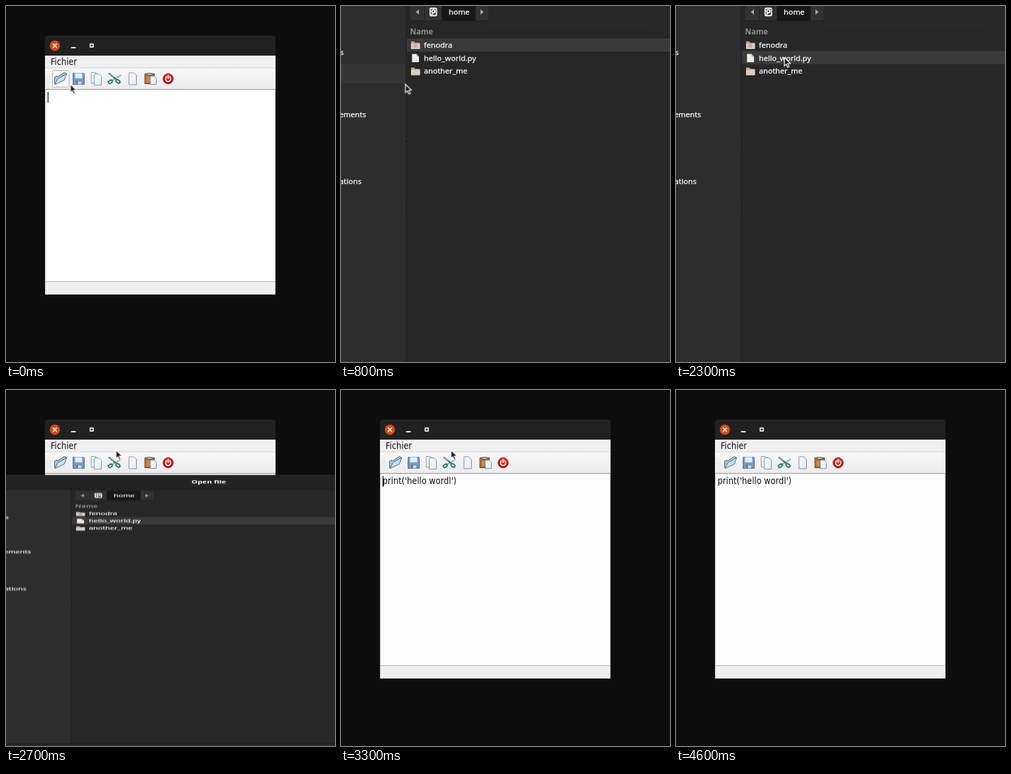
Write an HTML page that moves like this. It is 498 px wide and 538 px high and loops after 4.9 s.

```html
<!DOCTYPE html>
<html lang="fr">
<head>
<meta charset="utf-8">
<title>Text editor</title>
<style>
html, body { margin: 0; width: 100%; height: 100%; overflow: hidden; background: #0d0d0d; }
svg { display: block; width: 498px; height: 538px; }
.qt { font: 13.6px "DejaVu Sans Condensed", "Noto Sans", sans-serif; fill: #111; white-space: pre; }
.gtk { font: 500 11.6px "Noto Sans", "Open Sans", sans-serif; fill: #fff; stroke: #fff; stroke-width: .25; }
.bold { font-weight: 700; stroke: none; }
.end { text-anchor: end; }
.mid { text-anchor: middle; }

/* Every part shares one loop and changes in hard steps. */
.anim { animation: 4.9s step-end infinite; }
#hover { animation-name: hover; }
#blur { animation-name: blur; }
#caret { animation-name: caret; }
#doc { animation-name: doc; }
#dialog { animation-name: dialog; transform-origin: 0 346px; }
#place { animation-name: place; }
#row { animation-name: row; }
#pointer { animation-name: pointer; }
#arrow { animation-name: arrow; }
#beam { animation-name: beam; }

@keyframes hover {
  0% { opacity: 1; fill: #fbfbfb; }
  6.12% { opacity: 1; fill: #d9d9d9; }
  8.16%, 100% { opacity: 0; }
}
@keyframes blur {
  0% { opacity: 0; }
  12.24% { opacity: .6; }
  14.28% { opacity: 1; }
  55.1%, 100% { opacity: 0; }
}
@keyframes caret {
  0% { opacity: 1; }
  8.16% { opacity: 0; }
  59.18% { opacity: 1; }
  71.42% { opacity: 0; }
  83.67% { opacity: 1; }
  93.87%, 100% { opacity: 0; }
}
@keyframes doc {
  0% { opacity: 0; }
  55.1%, 100% { opacity: 1; }
}
@keyframes dialog {
  0% { opacity: 0; transform: none; }
  16.32% { opacity: 1; transform: none; }
  55.1% { opacity: 1; transform: scaleY(.554); }
  57.14% { opacity: 1; transform: scaleY(.12); }
  59.18%, 100% { opacity: 0; transform: none; }
}
@keyframes place {
  0% { opacity: 1; }
  28.57%, 100% { opacity: 0; }
}
@keyframes row {
  0% { transform: none; }
  46.93%, 100% { transform: translateY(19px); }
}
@keyframes pointer {
  0% { transform: translate(97.5px, 118.3px); }
  26.53% { transform: translate(103px, 144px); }
  28.57% { transform: translate(124px, 122px); }
  30.61% { transform: translate(148px, 86px); }
  32.65% { transform: translate(160.5px, 64.3px); }
  34.69% { transform: translate(163px, 70px); }
  36.73% { transform: translate(164px, 78px); }
  55.1% { transform: translate(166.5px, 91px); }
  77.55% { transform: translate(171px, 119px); }
  79.59% { transform: translate(183px, 192px); }
  81.63% { transform: translate(199px, 286px); }
  83.67% { transform: translate(217px, 392px); }
  85.71% { transform: translate(234px, 494px); }
  87.75%, 100% { transform: translate(246px, 560px); }
}
@keyframes arrow {
  0% { opacity: 1; }
  79.59% { opacity: 0; }
  85.71%, 100% { opacity: 1; }
}
@keyframes beam {
  0% { opacity: 0; }
  79.59% { opacity: 1; }
  85.71%, 100% { opacity: 0; }
}
</style>
</head>
<body>
<svg viewBox="0 0 498 538">
  <defs>
    <linearGradient id="bar" x2="0" y2="1">
      <stop stop-color="#f7f7f7"/><stop offset="1" stop-color="#ececec"/>
    </linearGradient>
    <linearGradient id="blue" x2="1" y2="1">
      <stop stop-color="#f4fafd"/><stop offset="1" stop-color="#a9c9de"/>
    </linearGradient>
    <linearGradient id="paper" x2="1" y2="1">
      <stop stop-color="#fff"/><stop offset="1" stop-color="#dbe8f0"/>
    </linearGradient>
    <radialGradient id="red" cy=".3">
      <stop stop-color="#ef5a4c"/><stop offset="1" stop-color="#b90f0f"/>
    </radialGradient>
    <pattern id="dots" width="3" height="3" patternUnits="userSpaceOnUse">
      <path d="M0 0h1v1H0z" fill="#c4c4c4"/>
    </pattern>
    <path id="sheet" d="M0 0h7l4 4v14H0z" stroke-linejoin="round"/>
    <path id="titlebar" d="M59 76V49q0-4 4-4h341q4 0 4 4v27z"/>
    <g id="folder">
      <path d="M.5 2.5q0-1 1-1h4l1.5 2h6q1 0 1 1V12q0 1-1 1h-11.500q-1 0-1-1z" fill="#b9a894"/>
      <path d="M.5 5h13.500v7q0 1-1 1h-11.500q-1 0-1-1z" fill="#dccfbe"/>
    </g>
  </defs>

  <rect width="498" height="538" fill="#0d0d0d"/>

  <!-- Editor window -->
  <g>
    <use href="#titlebar" fill="#212121"/>
    <path d="M63 45.500h341" stroke="#2d2d2d"/>
    <circle cx="74" cy="60" r="7.700" fill="#dc4a1a"/>
    <g id="blur" class="anim">
      <use href="#titlebar" fill="#2c2c2c"/>
      <circle cx="74" cy="60" r="7.700" fill="#484848"/>
    </g>
    <path d="M71 57l6 6m0-6l-6 6" stroke="#fff" stroke-width="1.700"/>
    <path d="M98.500 63h7" stroke="#f2f2f2" stroke-width="2"/>
    <rect x="127.500" y="57.500" width="4.500" height="4.500" fill="none" stroke="#f2f2f2" stroke-width="1.700"/>

    <rect x="59" y="75" width="349" height="361" fill="#f0f0f0"/>
    <text class="qt" x="67.500" y="88.500">Fichier</text>
    <rect x="59" y="94" width="349" height="32" fill="url(#bar)"/>
    <path d="M59 93.500h349" stroke="#d8d8d8"/>
    <rect x="63" y="102" width="5" height="15" fill="url(#dots)"/>
    <rect id="hover" class="anim" x="70.500" y="97.500" width="25" height="25" rx="2" stroke="#b4b4b4"/>

    <g stroke-width="1" stroke-linejoin="round" stroke-linecap="round">
      <g id="open" stroke="#456a82">
        <path d="M73.500 116.500v-9l3-1.500 2 1 9.500-6.500 2.500 1v4z" fill="#a9c3d3"/>
        <path d="M74 118.500l4.500-8.500 13.500-8-3.500 9.500z" fill="url(#blue)"/>
      </g>
      <g id="save" stroke="#4c6a8c">
        <path d="M102.500 101.500h15l1 1v16h-17v-16z" fill="#6f9cc8"/>
        <path d="M104.500 101.500h11v8h-11z" fill="#e3edf5" stroke="#9bb7cf"/>
        <path d="M105.500 113.500h9v5h-9z" fill="#d0d5d9" stroke="#7c8c99"/>
        <path d="M107.500 114.500v3" stroke="#46586a" stroke-width="2"/>
      </g>
      <g id="copy" stroke="#6f93ab" fill="url(#paper)">
        <use href="#sheet" transform="translate(129.500 100.500) scale(.9)"/>
        <use href="#sheet" transform="translate(134 102.500) scale(.95)"/>
      </g>
      <g id="cut" fill="none">
        <path d="M156 102l11 9" stroke="#7697a5" stroke-width="2.400"/>
        <path d="M173 105l-13 8" stroke="#9db4bd" stroke-width="2.400"/>
        <path d="M163 108l3 2" stroke="#3d6372" stroke-width="2"/>
        <ellipse cx="158" cy="114.500" rx="3.200" ry="2.200" transform="rotate(-35 158 114.500)" stroke="#237a80" stroke-width="2"/>
        <ellipse cx="169.500" cy="114" rx="3.300" ry="2.200" transform="rotate(35 169.500 114)" stroke="#237a80" stroke-width="2"/>
      </g>
      <use href="#sheet" x="186.500" y="101" fill="url(#paper)" stroke="#6f93ab"/>
      <g id="paste">
        <path d="M210.500 102.500h14v15h-14z" fill="#a5632f" stroke="#69401f"/>
        <path d="M214 101.500h7v3h-7z" fill="#b9bdc0" stroke="#6d6d6d"/>
        <path d="M212.500 106.500h6v9h-6z" fill="#c88a50" stroke="none"/>
        <use href="#sheet" transform="translate(218.500 106) scale(.82 .7)" fill="url(#paper)" stroke="#527a92"/>
      </g>
      <g id="quit" fill="none">
        <circle cx="245.500" cy="110" r="7.700" fill="url(#red)" stroke="#9c1414"/>
        <path d="M243 107a4 4 0 1 0 5 0M245.500 105v4.500" stroke="#fff" stroke-width="1.600"/>
      </g>
    </g>

    <path d="M59 125.500h349" stroke="#c9c9c9"/>
    <rect x="59" y="126" width="349" height="291" fill="#fff"/>
    <path d="M59 126.500h349M59 416.500h349" stroke="#b0b0b0"/>
    <path d="M59.500 127v309M407.500 127v309" stroke="#c8c8c8"/>
    <g id="doc" class="anim">
      <rect x="60" y="127" width="347" height="289" fill="#fdfdfd"/>
      <text class="qt" x="63" y="142">print('hello wordl')</text>
    </g>
    <rect id="caret" class="anim" x="63" y="130" width="1.200" height="16" fill="#000"/>
    <path d="M407 426v9h-9z" fill="url(#dots)"/>
  </g>

  <!-- File chooser -->
  <g id="dialog" class="anim">
    <rect y="-47" width="498" height="787" fill="#272727"/>
    <rect y="-47" width="498" height="39" fill="#232323"/>
    <path d="M0 -46.500h498" stroke="#343434"/>
    <path d="M0 -8h498" stroke="#1a1a1a"/>
    <text class="gtk bold mid" x="307" y="-23.500">Open file</text>

    <rect y="-7" width="98" height="694" fill="#2d2d2d"/>
    <rect id="place" class="anim" y="87" width="98" height="30" fill="#353535"/>
    <path d="M98.500 -7v694" stroke="#222"/>
    <path d="M99.500 196v25M99.500 292v25" stroke="#1c1c1c" stroke-dasharray="2 5" stroke-width="2"/>
    <g class="gtk end">
      <text x="4" y="74">Documents</text>
      <text x="38" y="168">Téléchargements</text>
      <text x="31" y="269">Applications</text>
    </g>

    <path d="M105 -4h118v27H105z" fill="#323232"/>
    <path d="M153 -4h50v27h-50z" fill="#171717"/>
    <path d="M126.500 -4v27M152.500 -4v27M203.500 -4v27M105 22.500h118" stroke="#1f1f1f"/>
    <path d="M118 5v8l-5-4zM211 5v8l5-4z" fill="#a5a5a5"/>
    <g fill="none" stroke="#fff" stroke-width="1.800">
      <rect x="135" y="3.500" width="9.500" height="11" rx="1"/>
      <circle cx="139.800" cy="8" r="2.300"/>
      <path d="M137 13l2-2"/>
    </g>
    <text class="gtk" x="163" y="13">home</text>
    <path d="M224 28.500h248" stroke="#2c2c2c"/>
    <text class="gtk bold" x="104.500" y="42.500" style="fill:#8e8e8e">Name</text>

    <rect id="row" class="anim" x="100" y="49" width="398" height="20" fill="#3a3a3a"/>
    <use href="#folder" x="105.500" y="52"/>
    <path d="M109.500 61v-2l3-2.500 3 2.500v4h-6z" fill="#c3a99b"/>
    <path d="M107.500 72.500h6.500l4 4V85h-10.500z" fill="#f1f0ec"/>
    <path d="M114 72.500v4h4z" fill="#bdbbb5"/>
    <path d="M109.500 79h6M109.500 81.500h6" stroke="#dedcd7"/>
    <use href="#folder" x="105.500" y="91.500"/>
    <g class="gtk">
      <text x="125.500" y="63">fenodra</text>
      <text x="125.500" y="82.700">hello_world.py</text>
      <text x="125.500" y="102.400">another_me</text>
    </g>
    <path d="M0 687h498" stroke="#1b1b1b" stroke-width="2"/>
    <rect y="688" width="498" height="52" fill="#2b2b2b"/>
  </g>

  <g id="pointer" class="anim">
    <path id="arrow" class="anim" d="M0 0v12.500l2.800-2.500 2.200 4.700 2.300-1-2.200-4.600 4-.3z" fill="#1c1c1c" stroke="#fff" stroke-width="1.200"/>
    <path id="beam" class="anim" d="M1 0h2l1 1 1-1h2M4 1v13M1 15h2l1-1 1 1h2" fill="none" stroke="#222"/>
  </g>
</svg>
</body>
</html>
```
